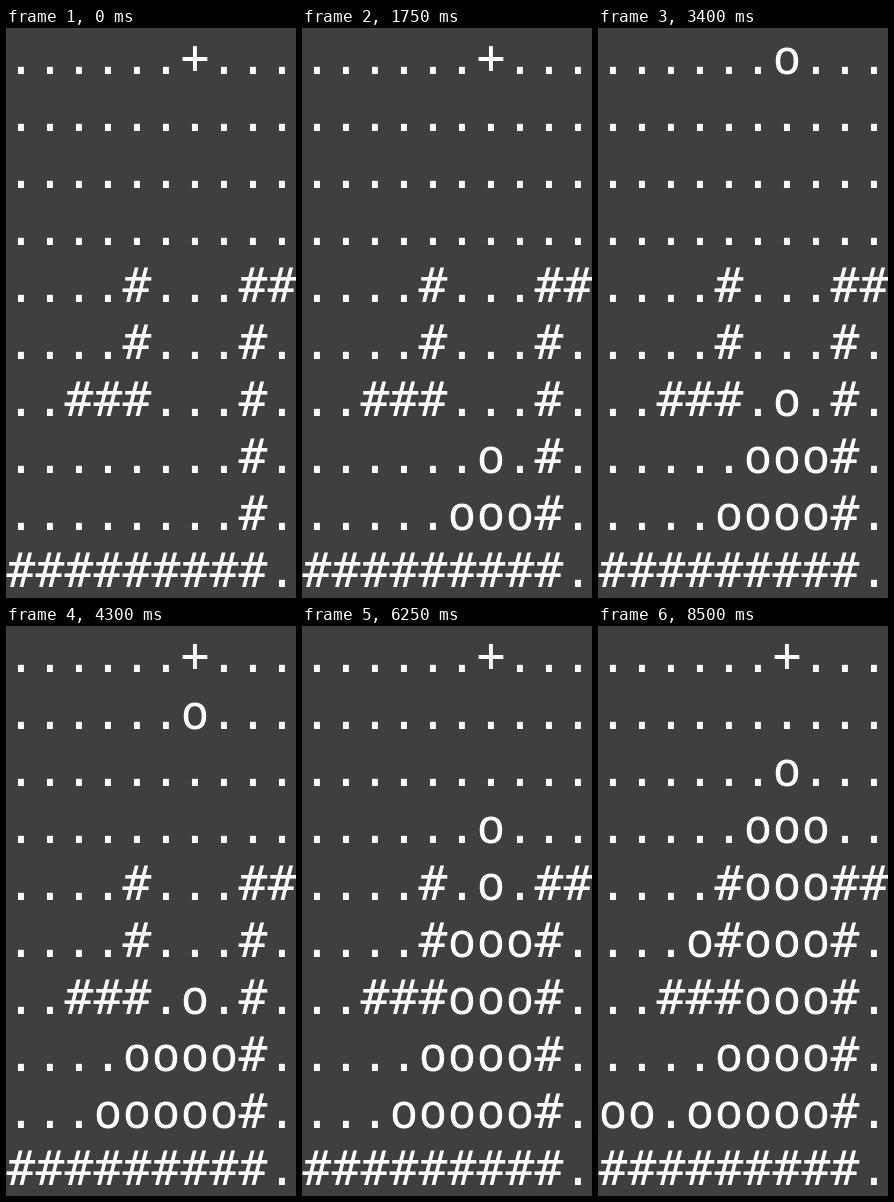
Animation of 290x570 px, one loop 8.55 s. Source, as an HTML page:

```html
<!DOCTYPE html>
<html lang="en">
<head>
<meta charset="utf-8">
<title>Falling sand</title>
<style>
  html, body { margin: 0; width: 100%; height: 100%; overflow: hidden; background: #3e403d; }
  svg { display: block; }
  text { font: 48px "DejaVu Sans Mono", monospace; fill: #fff; text-anchor: middle; }
</style>
</head>
<body>
<svg id="stage" width="290" height="570" viewBox="0 0 290 570"></svg>
<script>
const CELL_W = 29, CELL_H = 57, BASELINE = 46;
const STEP = 50, GRAINS = 25, SOURCE = 6;
const cave = [
  "......+...",
  "..........",
  "..........",
  "..........",
  "....#...##",
  "....#...#.",
  "..###...#.",
  "........#.",
  "........#.",
  "#########."
];

const put = (rows, y, x) =>
  rows.map((row, i) => i === y ? row.slice(0, x) + "o" + row.slice(x + 1) : row);

// Every grain moves one row per step: down, else down-left, else down-right.
function simulate() {
  const states = [cave];
  let settled = cave;
  for (let n = 0; n < GRAINS; n++) {
    let x = SOURCE, y = 0, next;
    do {
      states.push(put(settled, y, x));
      next = [x, x - 1, x + 1].find(c => settled[y + 1][c] === ".");
      if (next !== undefined) { x = next; y++; }
    } while (next !== undefined);
    settled = put(settled, y, x);
  }
  return states;
}

const states = simulate();
const columns = Array.from(cave[0], (_, c) => c * CELL_W + 15).join(" ");
const lines = cave.map((row, r) => {
  const line = document.createElementNS("http://www.w3.org/2000/svg", "text");
  line.setAttribute("x", columns);
  line.setAttribute("y", r * CELL_H + BASELINE);
  line.textContent = row;
  return document.getElementById("stage").appendChild(line);
});

const start = performance.now();
function draw(now) {
  const step = Math.floor(Math.max(0, now - start) / STEP) % states.length;
  states[step].forEach((row, r) => {
    if (lines[r].textContent !== row) lines[r].textContent = row;
  });
  requestAnimationFrame(draw);
}
draw(start);
</script>
</body>
</html>
```
